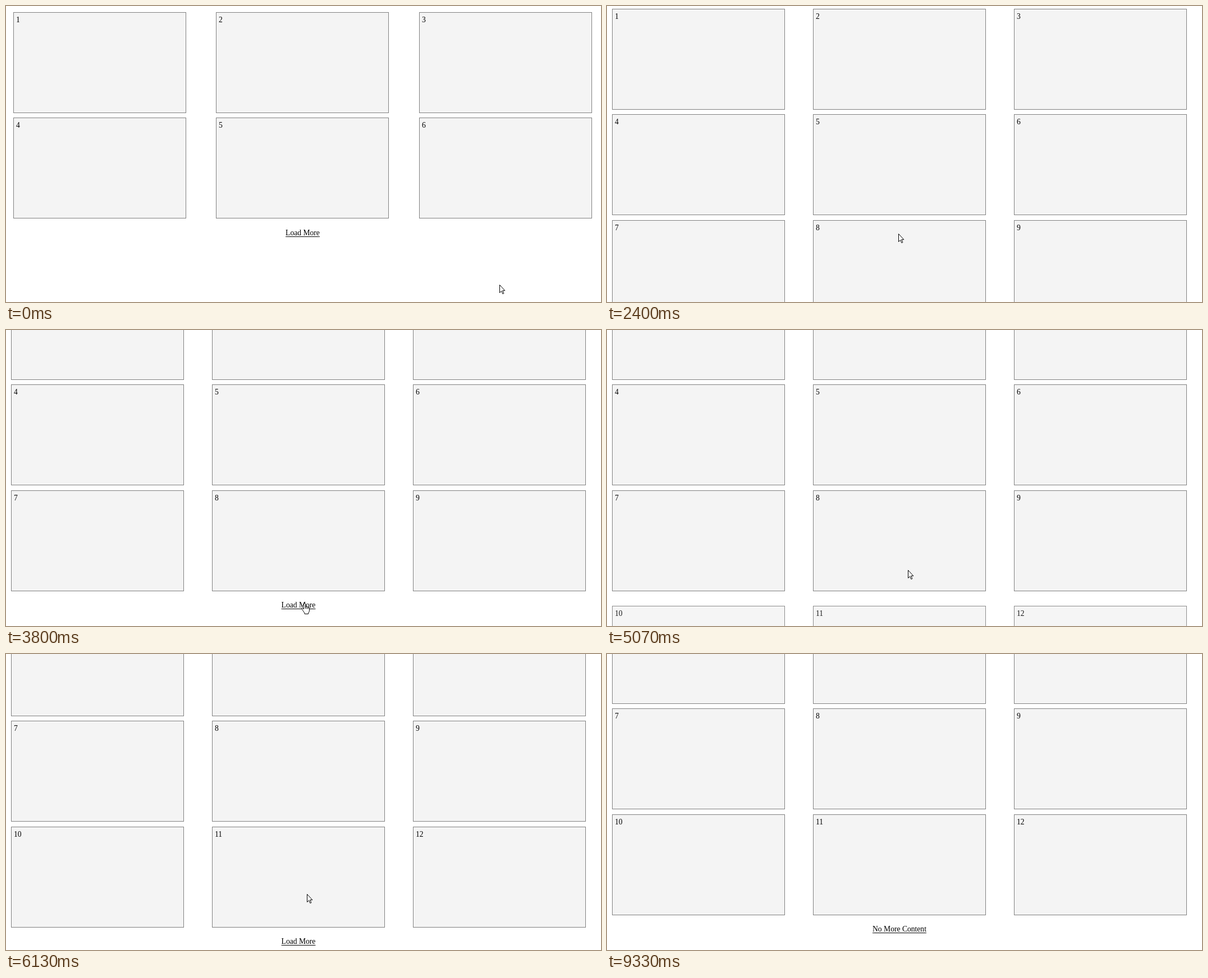
These frames come from a looping animation (1060 by 528 pixels, 9590 ms). An HTML page:

```html
<!DOCTYPE html>
<html lang="en">
<head>
<meta charset="utf-8">
<title>Load More</title>
<style>
  html, body { margin: 0; width: 100%; height: 100%; overflow: hidden; background: #fff; }
  body { position: relative; color: #000; font: 13.6px/15px "Liberation Serif", "Times New Roman", serif; }
  .card, #link, svg { position: absolute; left: 0; top: 0; }
  .card { box-sizing: border-box; width: 308px; height: 180px; padding: 5px 4px;
    border: 1px solid #808080; background: #f4f4f4; }
  #link { text-align: center; text-decoration: underline 1px; text-underline-offset: 2px;
    text-decoration-skip-ink: none; }
  svg { overflow: visible; fill: #fff; stroke: #000; stroke-linejoin: round; }
</style>
</head>
<body>
<div id="link"></div>
<svg id="arrow" width="12" height="18"><path d="M.5.5v14l3.2-3 2.2 5 2-.9-2.2-4.9h4.2z"/></svg>
<svg id="hand" width="15" height="20"><path d="M4.5 11V2a1.5 1.5 0 0 1 3 0v5q1.2-1.2 2.5 0 1.3-.9 2.3.4 2.2-.4 2.2 1.6v4q0 3-2 5v1.5H6V18q-1.5-2-3-4.5l-2-3q-.6-1.8 1.2-1.7 1 .2 2.3 2.2zM7.5 7v3M10 7.5v3M12.3 8v2.5"/></svg>
<script>
const LOOP = 9590, PITCH = 188.4;
const CLICKS = [1270, 4470], LAST_CLICK = 7470;
const REVEALS = [1320, 4445];   // start of the slide-in of rows 3 and 4

const SCROLL = [[2335, 0], [2400, 6], [2470, 20], [2530, 38], [2670, 72], [2870, 94], [3130, 102],
  [5465, 102], [5530, 134], [5600, 185], [5670, 225], [5800, 262], [6050, 262], [6400, 290.4]];
const POINTER = [[40, 879, 497], [800, 519, 406], [3440, 519, 406], [3800, 531, 487],
  [4440, 531, 487], [4730, 533, 458], [4840, 533, 458], [5070, 536, 428],
  [6200, 536, 428], [6870, 520, 502], [7030, 520, 502], [7200, 519, 492],
  [7830, 519, 492], [8470, 665, 495]];

const byId = id => document.getElementById(id);
const link = byId('link'), arrow = byId('arrow'), hand = byId('hand');
const cards = Array.from({ length: 12 }, (_, i) => {
  const card = document.createElement('div');
  card.className = 'card';
  card.textContent = i + 1;
  document.body.insertBefore(card, link);
  return card;
});

const clamp = v => Math.min(1, Math.max(0, v));
const linear = u => u;
const smooth = u => u * u * (3 - 2 * u);

// CSS "ease": cubic-bezier(.25, .1, .25, 1)
function ease(x) {
  let lo = 0, hi = 1;
  const bezier = (u, a, b) => 3 * u * (1 - u) ** 2 * a + 3 * u * u * (1 - u) * b + u ** 3;
  for (let i = 0; i < 20; i++) {
    const mid = (lo + hi) / 2;
    if (bezier(mid, .25, .25) < x) lo = mid; else hi = mid;
  }
  return x >= 1 ? 1 : bezier(lo, .1, 1);
}

// Value number k of a keyed track at time t
function track(keys, t, k, curve) {
  const i = keys.findIndex(key => key[0] > t);
  if (i === 0) return keys[0][k];
  if (i < 0) return keys[keys.length - 1][k];
  const a = keys[i - 1], b = keys[i];
  return a[k] + (b[k] - a[k]) * curve((t - a[0]) / (b[0] - a[0]));
}

const rowsAt = t => 2 + CLICKS.filter(c => t >= c).length;
const linkBase = (t, scroll) => Math.round(21.2 + PITCH * rowsAt(t) - 0.0 - 0 + 11 - scroll);

function place(el, x, y) {
  el.style.left = x + 'px';
  el.style.top = y + 'px';
}

function show(el, on) {
  el.style.visibility = on ? 'visible' : 'hidden';
}

function draw(t) {
  const rows = rowsAt(t), wide = rows === 2;
  const left = wide ? 13 : 9, step = wide ? 361.5 : 358;
  const scroll = track(SCROLL, t, 1, linear);

  cards.forEach((card, i) => {
    const row = Math.floor(i / 3);
    const p = row < 2 ? 1 : ease(clamp((t - REVEALS[row - 2]) / 1000));
    place(card, Math.floor(left + step * (i % 3)), Math.round(11 + PITCH * row + 180 * (1 - p) - scroll));
    card.style.opacity = p;
    show(card, row < rows);
  });

  link.textContent = t < LAST_CLICK ? 'Load More' : 'No More Content';
  link.style.width = (wide ? 1057 : 1042) + 'px';
  place(link, 0, linkBase(t, scroll) - 12);

  let x = Math.round(track(POINTER, t, 1, smooth)), y = Math.round(track(POINTER, t, 2, smooth));
  if (t >= 8800) [x, y] = [908, 527];
  const visible = t < 8800 || (t >= 9270 && t < 9330);
  // the pointer shape lags one tick behind the layout
  const over = t < 8800 && Math.abs(y - linkBase(t - 60, scroll) + 4) < 9;
  place(arrow, x, y);
  place(hand, x - 5, y);
  show(arrow, visible && !over);
  show(hand, visible && over);
}

function tick() {
  draw(performance.now() % LOOP);
  requestAnimationFrame(tick);
}
tick();
</script>
</body>
</html>
```
